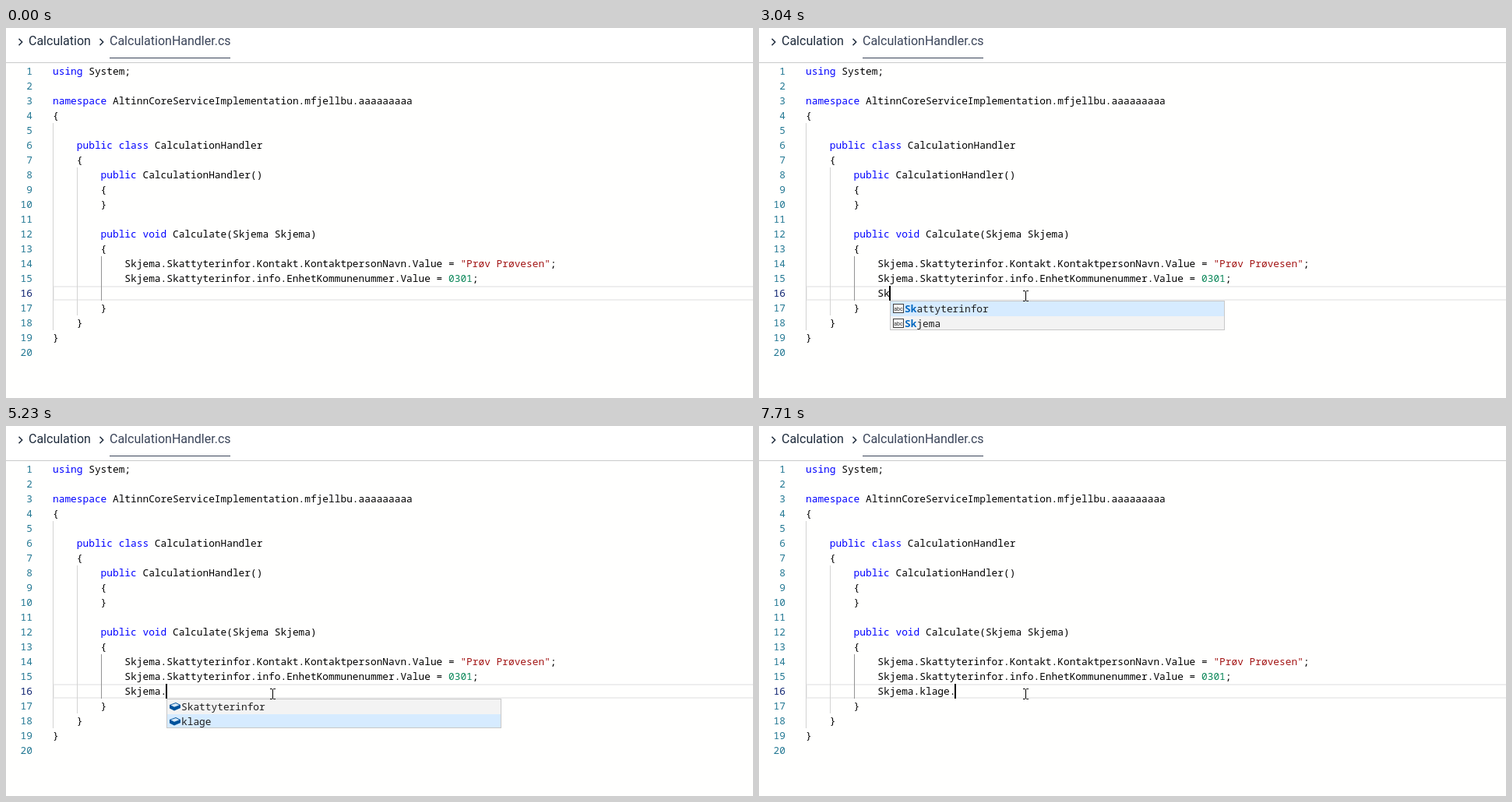
An HTML page for the animation above (8 s loop, 959 by 475 pixels).

```html
<!DOCTYPE html>
<html lang="en">
<head>
<meta charset="utf-8">
<title>Code completion</title>
<style>
  html, body { margin: 0; width: 100%; height: 100%; overflow: hidden; background: #fffffe; }
  #stage { position: relative; width: 959px; height: 475px; overflow: hidden; color: #000; }
  #stage > * { position: absolute; box-sizing: border-box; }
  header { inset: 0 0 auto; height: 45px; background: #fff; border-bottom: 1px solid #c9cacb;
    font: 16px/20px Roboto, sans-serif; color: #1e2b3c; }
  header span { position: absolute; top: 7px; }
  header .file { left: 133px; width: 155px; height: 31px; color: #3a4459; border-bottom: 1px solid #3a4459; }
  header svg { position: absolute; top: 13px; fill: none; stroke: #1e2b3c; stroke-width: 1.5; }
  pre, #popup { margin: 0; font: 12.83px/19px "Noto Sans Mono", monospace; white-space: pre; }
  pre { top: 46px; }
  #numbers { left: 0; width: 34px; text-align: right; color: #237893; }
  #numbers b { font-weight: normal; color: #0b216f; }
  #code { left: 60px; }
  .keyword { color: #00f; }
  .string { color: #a31515; }
  .number { color: #098658; }
  .guide { width: 1px; background: #d3d3d3; }
  .active { background: #939393; }
  #current { left: 60px; top: 331px; width: 910px; height: 19px; border: 2px solid #eee; }
  #caret { top: 331px; width: 2px; height: 19px; background: #000; }
  #popup { top: 350px; width: 430px; border: 1px solid #c8c8c8; background: #f3f3f3; overflow: hidden; color: #1e1e1e; }
  #popup div { position: relative; height: 19px; padding-left: 18px; }
  #popup div:last-child { height: 17px; }
  #popup .selected { background: #d6ebff; }
  #popup b { color: #0066bf; }
  #popup svg { position: absolute; left: 3px; top: 3px; }
  #mouse { fill: none; stroke: #000; }
</style>
</head>
<body>
<div id="stage">
  <header>
    <svg style="left:15px" width="8" height="10"><path d="M1.5 .8 5.7 5 1.5 9.2"/></svg>
    <span style="left:29px">Calculation</span>
    <svg style="left:119px" width="8" height="10"><path d="M1.5 .8 5.7 5 1.5 9.2"/></svg>
    <span class="file">CalculationHandler.cs</span>
  </header>
  <div id="current"></div>
  <div class="guide" style="left:60px;top:122px;height:266px"></div>
  <div class="guide" style="left:91px;top:179px;height:190px"></div>
  <div class="guide active" style="left:122px;top:293px;height:57px"></div>
  <pre id="numbers"></pre>
  <pre id="code"></pre>
  <div id="caret"></div>
  <div id="popup"></div>
  <svg id="mouse" width="7" height="16"><path d="M0 1.5H2.5L3.5 2.5 4.5 1.5H7M3.5 2V14M0 14.5H2.5L3.5 13.5 4.5 14.5H7"/></svg>
</div>
<script>
const LOOP = 8000, CHAR = 7.7, INDENT = 12;
const $ = id => document.getElementById(id);

const source = typed => `using System;

namespace AltinnCoreServiceImplementation.mfjellbu.aaaaaaaaa
{

    public class CalculationHandler
    {
        public CalculationHandler()
        {
        }

        public void Calculate(Skjema Skjema)
        {
            Skjema.Skattyterinfor.Kontakt.KontaktpersonNavn.Value = "Prøv Prøvesen";
            Skjema.Skattyterinfor.info.EnhetKommunenummer.Value = 0301;
            ${typed}
        }
    }
}
`;

const highlight = code => code.replace(
  /(".*?")|\b(using|namespace|public|class|void)\b|\b(\d+)\b/g,
  (text, string, keyword) =>
    `<span class="${string ? 'string' : keyword ? 'keyword' : 'number'}">${text}</span>`);

const wordIcon = `<svg width="14" height="12"><rect x=".5" y=".5" width="13" height="11" fill="#f6f6f6" stroke="#424242"/>
<text x="7" y="8.5" font-size="7" text-anchor="middle" fill="#333" font-family="Roboto, sans-serif">abc</text></svg>`;
const fieldIcon = `<svg width="14" height="12"><path d="M0 4 8 1 14 4V8L6 11.5 0 8.5Z" fill="#00539c"/>
<path d="M1.5 4.3 8 2 12.5 4.2 6 6.8Z" fill="#d6e8f7"/></svg>`;

const suggestions = {
  'S': ['Skattyterinfor', 'Skjema', 'System', 'AltinnCoreServiceImplementation'],
  'Sk': ['Skattyterinfor', 'Skjema'],
  'Skjema.': ['Skattyterinfor', 'klage'],
};

// [start ms, typed text, caret visible, selected suggestion or -1]
const steps = [
  [0, '', 0, -1], [860, '', 1, -1], [1470, '', 0, -1],
  [2120, 'S', 1, 0], [2430, 'Sk', 0, 0], [3040, 'Sk', 1, 0],
  [3350, 'Sk', 0, 1], [3660, 'Sk', 1, 1],
  [3970, 'Skjema', 1, -1], [4610, 'Skjema.', 1, -1],
  [5230, 'Skjema.', 1, 1], [5560, 'Skjema.', 0, 1], [6160, 'Skjema.', 1, 1], [6470, 'Skjema.', 0, 1],
  [6780, 'Skjema.klage', 1, -1], [7400, 'Skjema.klage', 0, -1], [7710, 'Skjema.klage.', 1, -1],
];

function showStep([, typed, caretOn, selected]) {
  const caretX = Math.round(58.95 + CHAR * (INDENT + typed.length));
  const word = typed.split('.').pop();
  const icon = word ? wordIcon : fieldIcon;
  $('code').innerHTML = highlight(source(typed));
  $('caret').style.left = caretX + 'px';
  $('caret').hidden = !caretOn;
  $('popup').hidden = selected < 0;
  if (selected < 0) return;
  $('popup').style.left = caretX + 1 + 'px';
  $('popup').innerHTML = suggestions[typed].map((item, i) =>
    `<div class="${i === selected ? 'selected' : ''}">${icon}${item.replace(word, `<b>${word}</b>`)}</div>`).join('');
}

function moveMouse(time) {
  const [x, y] = time < 560 ? [415, 340] : [339, 336];
  $('mouse').style.cssText = `left:${x}px;top:${y}px;visibility:${time < 250 ? 'hidden' : 'visible'}`;
}

let shown;
function draw() {
  const time = performance.now() % LOOP;
  const step = steps.findLast(([start]) => start <= time);
  if (step !== shown) showStep(shown = step);
  moveMouse(time);
  requestAnimationFrame(draw);
}

$('numbers').innerHTML = Array.from({ length: 20 }, (_, i) => i === 15 ? '<b>16</b>' : i + 1).join('\n');
draw();
</script>
</body>
</html>
```
